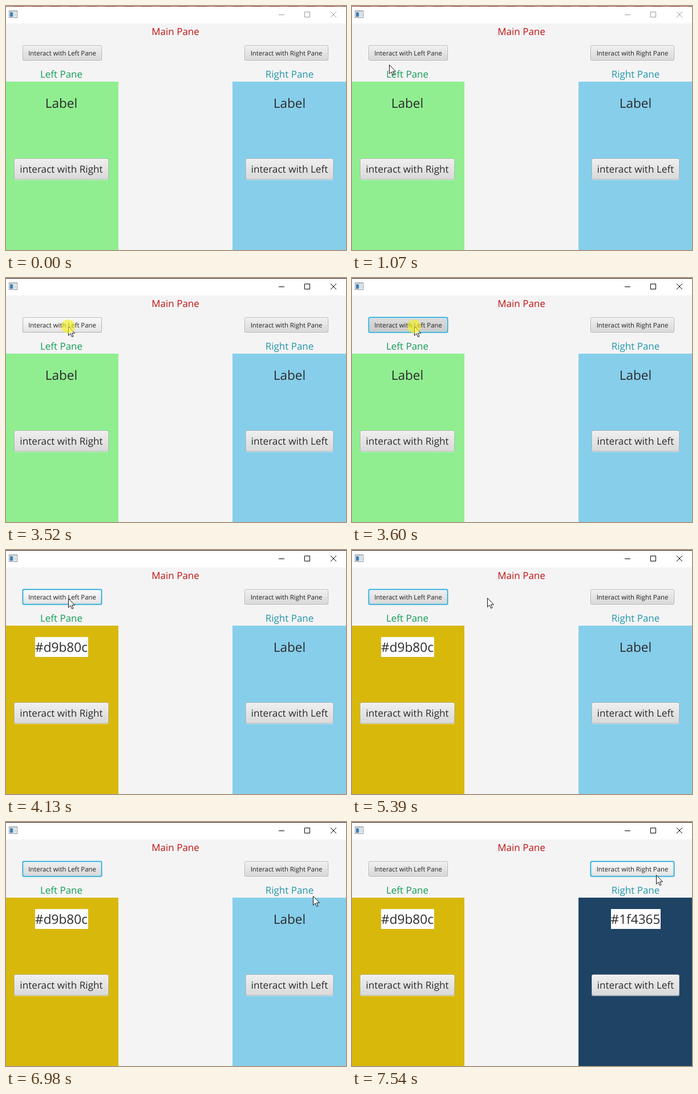
An HTML page for the animation above (8000 ms loop, 596x429 px).

```html
<!DOCTYPE html>
<html lang="en">
<head>
<meta charset="utf-8">
<title>Panes</title>
<style>
html, body { margin: 0; width: 100%; height: 100%; overflow: hidden; background: #f4f4f4; }
svg { display: block; width: 596px; height: 429px; }
text { font-family: "Open Sans", "Noto Sans", sans-serif; text-anchor: middle; fill: #2b2b2b; text-rendering: geometricPrecision; }
.title { font-size: 17px; }
.label { font-size: 22.6px; }
.small { font-size: 11.35px; fill: #222; }
.big { font-size: 17.2px; }
</style>
</head>
<body>
<svg viewBox="0 0 596 429">
  <defs>
    <linearGradient id="normal" x2="0" y2="1"><stop stop-color="#eee"/><stop offset="1" stop-color="#dadada"/></linearGradient>
    <linearGradient id="hover" x2="0" y2="1"><stop stop-color="#f8f8f8"/><stop offset="1" stop-color="#e5e5e5"/></linearGradient>
    <linearGradient id="pressed" x2="0" y2="1"><stop stop-color="#dcdcdc"/><stop offset="1" stop-color="#cbcbcb"/></linearGradient>
    <linearGradient id="rim" x2="0" y2="1"><stop stop-color="#fdfdfd"/><stop offset="1" stop-color="#e6e6e6"/></linearGradient>
    <linearGradient id="edge" x2="0" y2="1"><stop stop-color="#bababa"/><stop offset="1" stop-color="#a8a8a8"/></linearGradient>
  </defs>
  <rect width="596" height="429" fill="#f4f4f4"/>
  <rect width="596" height="30.5" fill="#fff"/>
  <rect id="strip" width="596" height="1"/>
  <path id="specks" d="M0 .5H596" stroke="#9a4436" stroke-dasharray="14 18"/>

  <rect x="5.5" y="8.5" width="14" height="12" fill="#fafafa" stroke="#8d9297"/>
  <path d="M6 9.5H19" stroke="#b9c0c6"/>
  <rect x="7" y="11" width="5" height="8" fill="#3f7fae"/>
  <path d="M13.5 11V19M16.5 11V19" stroke="#c3d3de" stroke-width="2"/>
  <path id="controls" d="M478 15.5H488M523.5 10.5H532.5V19.5H523.5ZM569 10L579 20M579 10L569 20" fill="none"/>

  <text class="title" x="297" y="51" style="fill:#bd1313">Main Pane</text>
  <text class="title" x="97" y="126" style="fill:#149c55">Left Pane</text>
  <text class="title" x="497" y="126" style="fill:#2196ab">Right Pane</text>

  <rect id="leftPane" y="133" width="197" height="296"/>
  <rect id="rightPane" x="397" y="133" width="199" height="296"/>
  <rect id="leftBox" x="51" y="153" width="93" height="35" fill="#fff"/>
  <rect id="rightBox" x="454" y="153" width="87" height="35" fill="#fff"/>
  <text id="leftLabel" class="label" x="97" y="179"></text>
  <text id="rightLabel" class="label" x="497" y="179"></text>
  <g id="buttons"></g>
  <g id="pointer">
    <path d="M.5 .5V16.2L4.1 12.8L6.6 18.5L9 17.5L6.5 12H11.5Z" fill="#fff" stroke="#111"/>
    <circle id="click" r="12" fill="#f4f01e" opacity=".65"/>
  </g>
</svg>
<script>
const LOOP = 8000, TICK = 80;
const $ = id => document.getElementById(id);

const move = (start, end, from, to) => ({ start, end, from, to });
const moves = [
  move(590, 1390, [401, 412], [42, 82]),
  move(1540, 1700, [52, 80], [84, 85]),
  move(2010, 2330, [85, 91], [86, 226]),
  move(2490, 2730, [63, 215], [123, 215]),
  move(3040, 3360, [121, 196], [109, 85]),
  move(5310, 5870, [122, 85], [432, 83]),
  move(6030, 6270, [488, 81], [551, 87]),
  move(6500, 6820, [554, 100], [549, 196]),
  move(6900, 7220, [545, 181], [533, 93])
];

const easeOut = x => 1 - (1 - x) ** 3;

// The pointer was sampled once per tick, so it moves in small jumps.
function pointerAt(t) {
  const current = moves.filter(m => t >= m.start).pop();
  if (!current) return null;
  const { start, end, from, to } = current;
  const elapsed = Math.floor((t - start) / TICK) * TICK;
  const k = easeOut(Math.min(1, elapsed / (end - start)));
  return from.map((v, i) => Math.round(v + (to[i] - v) * k));
}

function add(parent, tag, attrs) {
  const node = document.createElementNS("http://www.w3.org/2000/svg", tag);
  for (const key in attrs) node.setAttribute(key, attrs[key]);
  return parent.appendChild(node);
}

function show(node, on) { node.style.display = on ? "" : "none"; }

function makeButton(x, y, w, h, size, caption, baseline) {
  const layer = (inset, r, fill, opacity = 1, dy = 0) => add($("buttons"), "rect", {
    x: x + inset, y: y + inset + dy, width: w - 2 * inset, height: h - 2 * inset, rx: r, fill, opacity
  });
  layer(0, 3, "#fff", .65, 1);
  layer(0, 3, "url(#edge)");
  const ring = layer(-.2, 3, "#039ed3");
  layer(1, 2, "url(#rim)");
  const body = layer(2, 1, "url(#normal)");
  const glow = layer(-1.4, 4, "#039ed3", .133);
  const core = layer(2.6, 1, "url(#normal)");
  add($("buttons"), "text", { class: size, x: x + w / 2, y: baseline }).textContent = caption;
  const contains = p => p && p[0] >= x && p[0] < x + w && p[1] >= y && p[1] < y + h;
  return (p, focused, pressed) => {
    const look = pressed ? "pressed" : contains(p) ? "hover" : "normal";
    for (const part of [body, core]) part.setAttribute("fill", `url(#${look})`);
    show(ring, focused);
    show(glow, focused);
  };
}

function paintPane(side, changed, plain, color) {
  $(side + "Pane").setAttribute("fill", changed ? color : plain);
  $(side + "Label").textContent = changed ? color : "Label";
  show($(side + "Box"), changed);
}

const leftButton = makeButton(29, 69, 139, 27, "small", "Interact with Left Pane", 87);
const rightButton = makeButton(418, 69, 147, 27, "small", "Interact with Right Pane", 87);
makeButton(14, 268, 166, 37, "big", "interact with Right", 293)(null, false, false);
makeButton(420, 268, 154, 37, "big", "interact with Left", 293)(null, false, false);

const leftClick = { down: 3520, focus: 3600, up: 4060, done: 4130 };
const rightClick = { down: 7380, focus: 7380, up: 7540, done: 7540 };

function draw(t) {
  const p = pointerAt(t);
  const active = t >= leftClick.down;
  const held = click => t >= click.down && t < click.up;
  const pressed = click => t >= click.focus && t < click.up;
  const rightFocused = t >= rightClick.focus;

  $("strip").setAttribute("fill", active ? "#2b0707" : "#6b1a16");
  show($("specks"), !active);
  $("controls").setAttribute("stroke", active ? "#000" : "#999");

  paintPane("left", t >= leftClick.done, "#90ee90", "#d9b80c");
  paintPane("right", t >= rightClick.done, "#87ceeb", "#1f4365");
  leftButton(p, t >= leftClick.focus && !rightFocused, pressed(leftClick));
  rightButton(p, rightFocused, pressed(rightClick));

  show($("pointer"), p);
  show($("click"), held(leftClick) || held(rightClick));
  if (p) $("pointer").setAttribute("transform", `translate(${p})`);
}

const origin = performance.now();
function frame() {
  draw((performance.now() - origin) % LOOP);
  requestAnimationFrame(frame);
}
frame();
</script>
</body>
</html>
```
